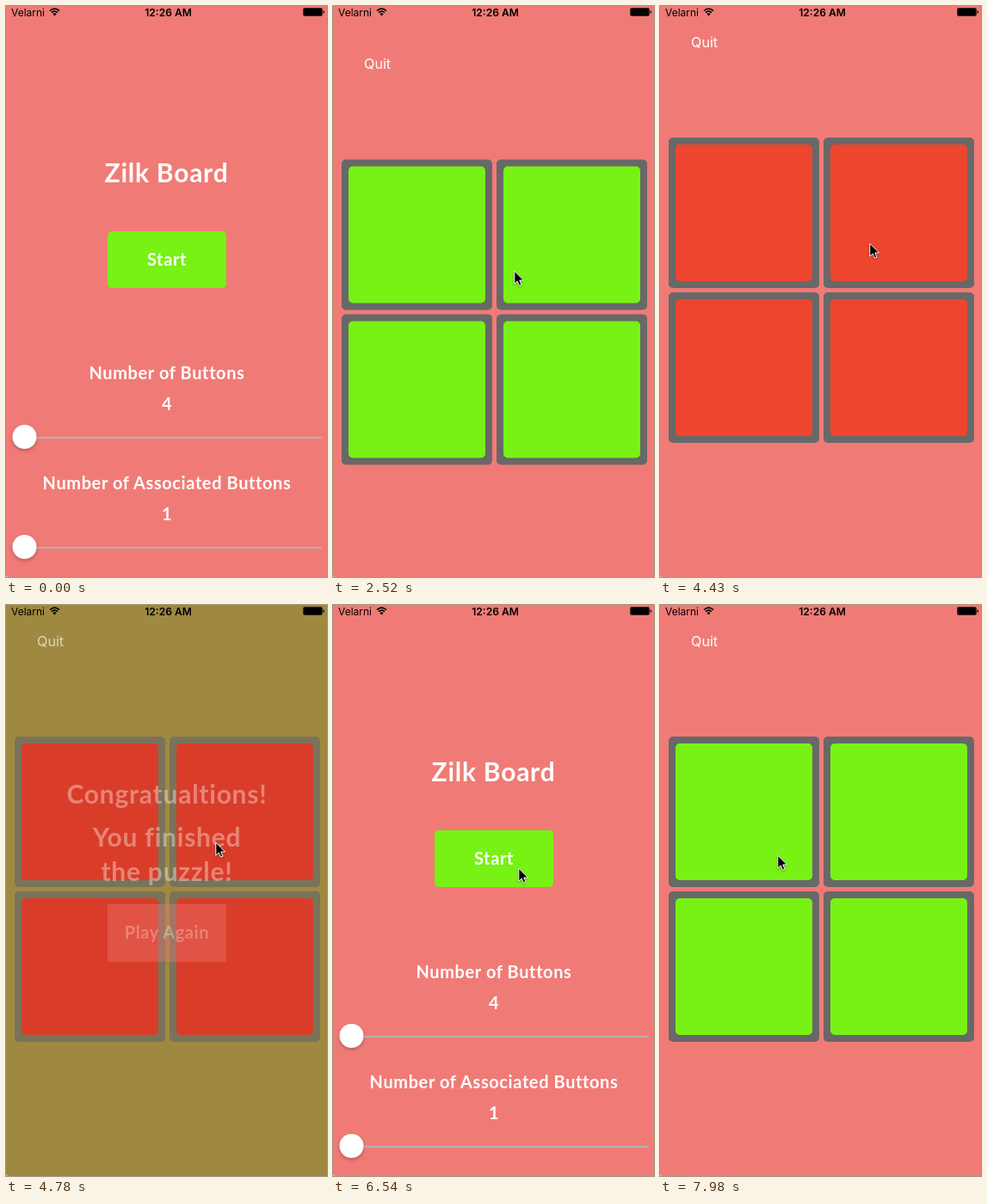
An HTML page for the animation above (8000 ms loop, 373x664 px).

```html
<!DOCTYPE html>
<html lang="en">
<head>
<meta charset="utf-8">
<title>Tile game</title>
<style>
  html, body { margin: 0; width: 100%; height: 100%; overflow: hidden; background: #f07b76; }
  svg { display: block; width: 373px; height: 664px; }
  text { fill: #fff; font: 700 20px Lato, sans-serif; letter-spacing: .03em; text-anchor: middle; }
  .big { font-size: 30px; letter-spacing: .025em; }
  #quit { font: 400 16.2px Inter, sans-serif; letter-spacing: 0; text-anchor: start; }
  #status text { fill: #000; font: 400 12px Inter, sans-serif; letter-spacing: 0; text-anchor: start; }
  #status .clock { font-weight: 600; font-size: 12.1px; text-anchor: middle; }
  .knob { fill: #fff; filter: drop-shadow(0 2px 2px rgba(0, 0, 0, .25)); }
  #cursor { filter: drop-shadow(0 1px 1px rgba(0, 0, 0, .35)); }
</style>
</head>
<body>
<svg viewBox="0 0 373 664">
  <g id="menu">
    <rect width="373" height="664" fill="#f07b76"/>
    <text class="big" x="186.5" y="205">Zilk Board</text>
    <rect x="118" y="262" width="138" height="66" rx="5" fill="#77f214"/>
    <text id="start" x="187" y="302">Start</text>
    <text x="187" y="434">Number of Buttons</text>
    <text x="187" y="470">4</text>
    <text x="187" y="562">Number of Associated Buttons</text>
    <text x="187" y="598">1</text>
    <path d="M8 502H367M8 630H367" stroke="#b7b1b1" stroke-width="2"/>
    <circle class="knob" cx="21.5" cy="501" r="14"/>
    <circle class="knob" cx="21.5" cy="629" r="14"/>
  </g>
  <g id="board">
    <rect id="back" width="373" height="664"/>
    <text id="quit" x="36" y="47.5">Quit</text>
    <g id="tiles"></g>
    <g id="win">
      <text class="big" x="187" y="231">Congratualtions!</text>
      <text class="big" x="187" y="281">You finished</text>
      <text class="big" x="187" y="321">the puzzle!</text>
      <rect x="118" y="348" width="138" height="67" fill="#f07b76"/>
      <text id="again" x="187" y="388">Play Again</text>
    </g>
  </g>
  <g id="status">
    <text x="6" y="11.5">Velarni</text>
    <path d="M51 5.6Q56.5 .6 62 5.6M53 7.7Q56.5 4.5 60 7.7" fill="none" stroke="#000" stroke-width="1.6"/>
    <path d="M54.4 9.3Q56.5 7.4 58.6 9.3L56.5 11.5z"/>
    <text class="clock" x="188.6" y="11.5">12:26 AM</text>
    <rect x="345.5" y="2.5" width="22" height="9" rx="1.5" fill="none" stroke="#000" stroke-width=".7"/>
    <rect x="346.1" y="3.1" width="20.8" height="7.8" rx=".7"/>
    <path d="M368.6 5.2q1.5 .4 1.5 1.8t-1.5 1.8z"/>
  </g>
  <path d="M0 661A3 3 0 0 0 3 664H0z" fill="#ddd"/>
  <path id="cursor" d="M.8 1.2v15l3.4-3.2 2.3 5.2 2.5-1.1-2.2-5.1h4.8z" stroke="#fff" stroke-width="1"/>
</svg>
<script>
const LOOP = 8000;
const PINK = [240, 123, 118], DARK_GREEN = [74, 152, 10];
const GREEN = [119, 242, 20], RED = [238, 69, 46], DEEP_RED = [222, 40, 22];
const $ = id => document.getElementById(id);
const ramp = (t, a, b) => Math.min(1, Math.max(0, (t - a) / (b - a)));
const smooth = x => x * x * (3 - 2 * x);
const lerp = (a, b, p) => a + (b - a) * p;
const rgb = color => `rgb(${color.map(Math.round)})`;
const mix = (a, b, p) => rgb(a.map((v, i) => lerp(v, b[i], p)));

// Pointer moves: start, end, target x, target y
const moves = [
  [1170, 1250, 280, 384], [1490, 1880, 214, 321], [1880, 2090, 210, 307],
  [3110, 3400, 145, 288], [4030, 4390, 243, 275], [5360, 5790, 234, 378],
  [6220, 6540, 215, 305], [7490, 7830, 137, 291], [7950, 7980, 136, 290]
];

function pointer(t) {
  let x = 348, y = 397;
  for (const [a, b, tx, ty] of moves) {
    const p = smooth(ramp(t, a, b));
    x = lerp(x, tx, p);
    y = lerp(y, ty, p);
  }
  return `translate(${x} ${y})`;
}

function addRect(x, y, size, fill) {
  const rect = document.createElementNS('http://www.w3.org/2000/svg', 'rect');
  const attrs = { x, y, width: size, height: size, rx: 5, fill };
  for (const key in attrs) rect.setAttribute(key, attrs[key]);
  return $('tiles').appendChild(rect);
}

const tiles = [0, 1, 2, 3].map(i => {
  const x = 10 + i % 2 * 180, y = 153 + (i >> 1) * 180;
  return {
    frame: addRect(x, y, 175, '#686868'),
    face: addRect(x + 8, y + 8, 159, rgb(GREEN)),
    flipAt: i % 3 ? 4430 : 3580
  };
});

// Critically damped spring, 0 to 1
function spring(ms) {
  const k = Math.max(0, ms) * .018;
  return 1 - (1 + k) * Math.exp(-k);
}

function draw(t) {
  const firstRound = t < 5890;
  const slideAt = firstRound ? 2240 : 7100;
  const pressAt = firstRound ? 2070 : 6860;
  const won = firstRound ? smooth(ramp(t, 4530, 5040)) : 0;

  $('board').setAttribute('transform', `translate(0 ${664 * (1 - spring(t - slideAt))})`);
  $('start').style.opacity = 1 - .8 * (ramp(t, pressAt, pressAt + 70) - ramp(t, slideAt, slideAt + 300));

  $('back').setAttribute('fill', mix(PINK, DARK_GREEN, won));
  const fade = 1 - won ** 1.5;
  $('quit').style.opacity = fade;
  for (const { frame, face, flipAt } of tiles) {
    const red = firstRound && t >= flipAt;
    frame.style.opacity = fade;
    face.style.opacity = 1 - won ** 3;
    face.setAttribute('fill', red ? mix(RED, DEEP_RED, won) : rgb(GREEN));
  }
  $('win').style.opacity = won ** 1.4;
  $('again').style.opacity = t >= 5820 && firstRound ? .3 : 1;

  $('cursor').setAttribute('transform', pointer(t));
  $('cursor').style.visibility = t < 1170 ? 'hidden' : 'visible';
}

const began = performance.now();
function tick() {
  draw((performance.now() - began) % LOOP);
  requestAnimationFrame(tick);
}
tick();
</script>
</body>
</html>
```
